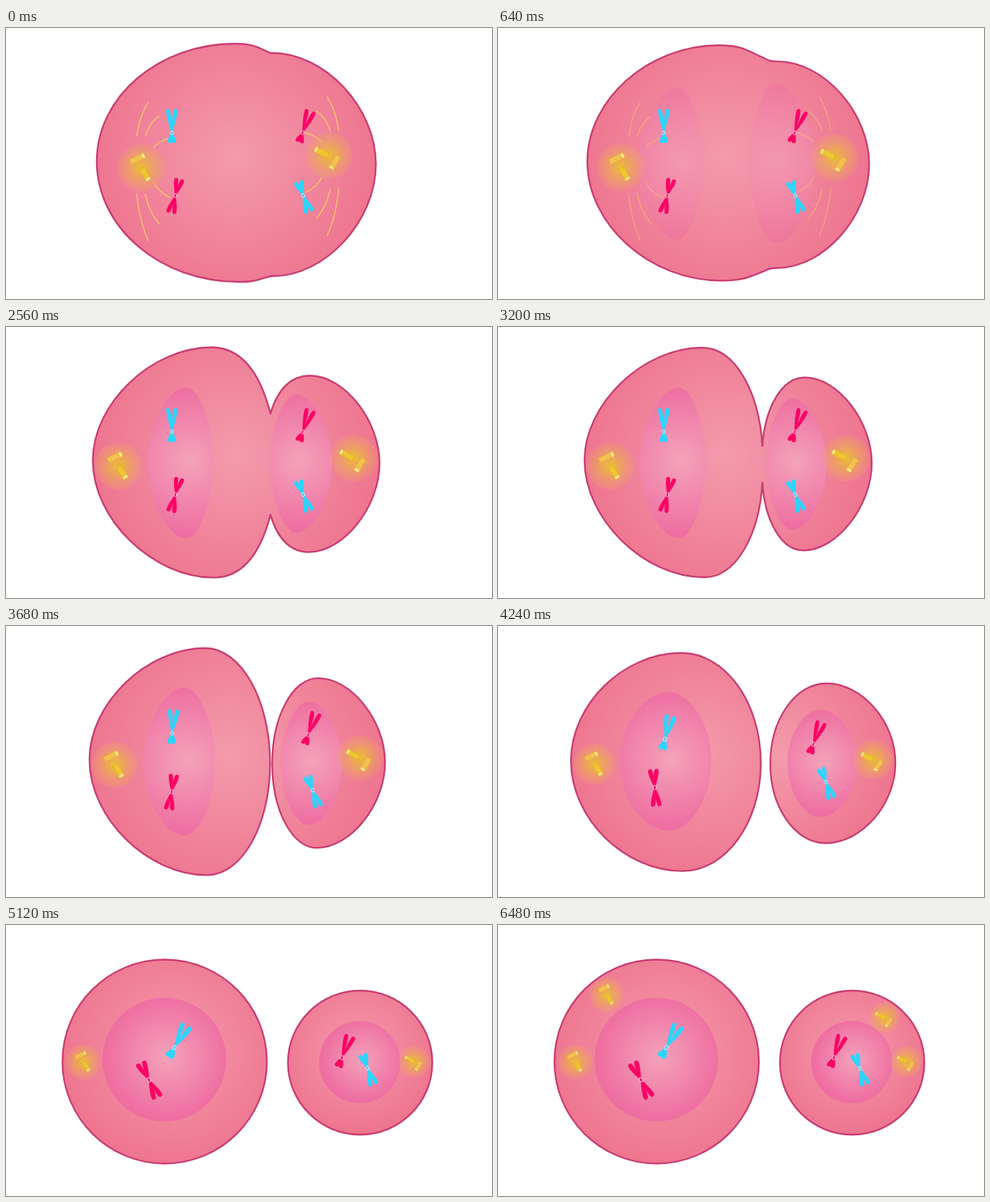
These frames come from a looping animation (680 px wide and 380 px high, 6.56 s). An HTML page with a canvas:

```html
<!DOCTYPE html>
<html lang="en">
<head>
<meta charset="utf-8">
<title>Cell division</title>
<style>
  html, body { margin: 0; width: 100%; height: 100%; overflow: hidden; background: #fff; }
  canvas { display: block; }
</style>
</head>
<body>
<canvas id="stage" width="680" height="380"></canvas>
<script>
const ctx = document.getElementById('stage').getContext('2d');
const LOOP = 6560, STEP = 80;
const SPLIT = 3520, ROUND = 5120;   // halves part, then become round
const K = 0.552;                    // Bezier handle length of a circle
const BLUE = '#2bd5fb', RED = '#fb0465';

const phase = (t, start, end) => Math.max(0, Math.min(1, (t - start) / (end - start)));
const mix = (a, b, p) => a + (b - a) * p;
const mixAll = (a, b, p) => a.map((v, i) => mix(v, b[i], p));

// whole -> split slows down by the given power; split -> round is even
function pose({ whole, split, round }, t, power) {
  if (t >= SPLIT) return mixAll(split, round, phase(t, SPLIT, ROUND));
  return mixAll(whole, split, 1 - (1 - t / SPLIT) ** power);
}

// side: -1 left, 1 right
function makeCell(side, whole, split, [x, y, r]) {
  return {
    whole, split,
    round: [x, y - r, x + side * r, y, x, y + r, K],
    inner: [x - side * r, y],
    light: [x - side * 8 + 4, y - 15, r * 1.15]
  };
}

// top x, y, outer x, y, bottom x, y, roundness; the last list is a circle
const cells = [
  makeCell(-1, [320, 22, 127, 187, 325, 356, .55],
    [285, 29, 121, 187, 288, 351, .5], [222, 191.5, 143]),
  makeCell(1, [372, 35, 517.5, 191, 373, 348, .51],
    [430, 71, 523, 191, 428, 313, .49], [495.5, 193, 101])
];

// peak x, top, bottom, left, right
const nuclei = [
  { whole: [251, 83, 297, 197, 286], split: [253, 85, 296, 199, 291],
    round: [221.5, 102, 275.5, 135, 308] },
  { whole: [382, 72, 306, 346, 440], split: [415, 103, 282, 378, 462],
    round: [495, 134.5, 250, 438, 551.5] }
];

// glow centre and radius; rods run from the plain end to the capped end
const poles = [
  { whole: [189, 196, 33.5], split: [157, 195, 33], round: [108, 192, 24.5],
    twin: [152, 98], rods: [[-15, -8, 3, -17], [1, 1, 10, 16]] },
  { whole: [451.5, 179, 33], split: [487, 184, 33], round: [571.5, 191.5, 22],
    twin: [541, 130], rods: [[14, 1, 4, 17], [-1, 0, -18, -9]] }
];

// arm lengths, then x, y, degrees, scale
const chromosomes = [
  { color: BLUE, up: 33, down: 14, from: [232, 147, 0, 1], to: [235.5, 172, 29, 1.1] },
  { color: RED, up: 24, down: 25, from: [237, 235, 14, 1], to: [200, 217, -26, 1.12] },
  { color: RED, up: 33, down: 14, from: [415, 147, 20, 1], to: [470, 186, 21, 1] },
  { color: BLUE, up: 21, down: 25, from: [416, 235, -20, 1], to: [506, 201, -20, 1] }
];

function radial(x, y, r, inner, outer) {
  const g = ctx.createRadialGradient(x, y, 0, x, y, r);
  g.addColorStop(0, inner);
  g.addColorStop(1, outer);
  return g;
}

// quarter arcs that leave or arrive horizontally
function arcFrom(path, x0, y0, x1, y1, k) {
  path.bezierCurveTo(mix(x0, x1, k), y0, x1, mix(y1, y0, k), x1, y1);
}
function arcInto(path, x0, y0, x1, y1, k) {
  path.bezierCurveTo(x0, mix(y0, y1, k), mix(x1, x0, k), y1, x1, y1);
}

function cellPath(cell, t) {
  const [tx, ty, sx, sy, bx, by, k] = pose(cell, t, 2);
  const furrow = phase(t, 0, SPLIT) ** 1.9;
  const [px, py] = mixAll([370, 193], cell.inner, phase(t, SPLIT, ROUND));
  const p1 = mix(35, py, furrow), p2 = mix(348, py, furrow);
  const lean = .35 * (1 - furrow);   // the furrow starts shallow
  const path = new Path2D();
  path.moveTo(px, p1);
  path.bezierCurveTo(mix(px, tx, lean), mix(p1, ty, K), mix(tx, px, K), ty, tx, ty);
  arcFrom(path, tx, ty, sx, sy, k);
  arcInto(path, sx, sy, bx, by, k);
  path.bezierCurveTo(mix(bx, px, K), by, mix(px, bx, lean), mix(p2, by, K), px, p2);
  return path;
}

function drawCells(t) {
  const paths = cells.map(cell => {
    const light = mixAll([320, 180, 205], cell.light, phase(t, SPLIT, ROUND));
    const path = cellPath(cell, t);
    ctx.fillStyle = radial(...light, '#f39bac', '#ee748f');
    ctx.fill(path);
    return path;
  });
  ctx.strokeStyle = '#c93d70';
  ctx.lineWidth = 2.4;
  paths.forEach(path => ctx.stroke(path));
}

function drawNucleus(nucleus, t) {
  const [x, top, bottom, left, right] = pose(nucleus, t, 1);
  const y = (top + bottom) / 2;
  const k = mix(.49, K, phase(t, SPLIT, ROUND));
  const path = new Path2D();
  path.moveTo(x, top);
  arcFrom(path, x, top, left, y, k);
  arcInto(path, left, y, x, bottom, k);
  arcFrom(path, x, bottom, right, y, k);
  arcInto(path, right, y, x, top, k);
  ctx.globalAlpha = .03 + .97 * phase(t, 0, 1280);
  ctx.fillStyle = radial(x + 4, y - 3, (bottom - top) / 2, '#f4a2ba', '#ee6ea0');
  ctx.fill(path);
  ctx.globalAlpha = 1;
}

// three fibres fan out above and below each pole, bending towards the middle
function drawFibres(t) {
  ctx.globalAlpha = 1 - phase(t, 0, 1280);
  ctx.strokeStyle = '#f4c768';
  ctx.lineWidth = 1.5;
  for (const [x, y, inward] of [[193, 192, 1], [455.5, 185, -1]])
    for (const reach of [-.9, 1.08])
      for (let i = 0; i < 3; i++) {
        const x0 = x + inward * (12 * i - 10), x1 = x + inward * (15 * i + 6);
        const y0 = y + Math.sign(reach) * (i < 2 ? 41 : 25);
        const y1 = y + reach * (98 - 16 * i - 6 * i * i);
        ctx.beginPath();
        ctx.moveTo(x0, y0);
        ctx.quadraticCurveTo(mix(x0, x1, .25), mix(y0, y1, .6), x1, y1);
        ctx.stroke();
      }
  ctx.globalAlpha = 1;
}

function drawRod([x0, y0, x1, y1], color) {
  const length = Math.hypot(x1 - x0, y1 - y0);
  ctx.save();
  ctx.translate(x0, y0);
  ctx.rotate(Math.atan2(y1 - y0, x1 - x0));
  ctx.strokeStyle = '#e3a93c';
  ctx.lineWidth = .7;
  ctx.fillStyle = color;
  ctx.beginPath();
  ctx.rect(0, -4, length, 8);
  ctx.fill();
  ctx.stroke();
  ctx.fillStyle = '#fbe98c';
  ctx.beginPath();
  ctx.ellipse(length, 0, 2.4, 4.2, 0, 0, 7);
  ctx.fill();
  ctx.stroke();
  ctx.restore();
}

function drawPole(x, y, r, rods) {
  ctx.save();
  ctx.translate(x, y);
  ctx.scale(r / 34, r / 34);
  ctx.fillStyle = radial(0, 0, 34, 'rgba(233,196,40,.93)', 'rgba(238,168,96,.2)');
  ctx.beginPath();
  ctx.arc(0, 0, 34, 0, 7);
  ctx.fill();
  drawRod(rods[0], '#f2c14e');
  drawRod(rods[1], '#eec62f');
  ctx.restore();
}

function drawPoles(pole, t) {
  const [x, y, r] = pose(pole, t, 4);
  drawPole(x, y, r, pole.rods);
  const apart = phase(t, 5280, 6480);
  if (apart > 0) drawPole(...mixAll([x, y], pole.twin, apart), r, pole.rods);
}

// teardrop from the middle to a blunt tip
function drawArm(x, y) {
  const length = Math.hypot(x, y);
  ctx.save();
  ctx.rotate(Math.atan2(y, x));
  ctx.beginPath();
  ctx.moveTo(-2, 0);
  ctx.bezierCurveTo(length * .5, -3, length * 1.1, -4.8, length, 0);
  ctx.bezierCurveTo(length * 1.1, 4.8, length * .5, 3, -2, 0);
  ctx.fill();
  ctx.restore();
}

function drawChromosome({ color, up, down, from, to }, t) {
  const [x, y, degrees, scale] = mixAll(from, to, phase(t, 3440, ROUND));
  ctx.save();
  ctx.translate(x, y);
  ctx.rotate(degrees * Math.PI / 180);
  ctx.scale(scale, scale);
  ctx.fillStyle = color;
  for (const side of [-1, 1]) {
    drawArm(side * (2 + up / 9), -up);
    drawArm(side * (2 + down / 9), down);
  }
  ctx.strokeStyle = 'rgba(255,255,255,.75)';
  ctx.lineWidth = .9;
  ctx.beginPath();
  ctx.ellipse(0, 0, 1.9, 2.9, 0, 0, 7);
  ctx.fill();
  ctx.stroke();
  ctx.restore();
}

function draw(t) {
  ctx.fillStyle = '#fff';
  ctx.fillRect(0, 0, 680, 380);
  ctx.lineCap = 'round';
  drawCells(t);
  nuclei.forEach(nucleus => drawNucleus(nucleus, t));
  drawFibres(t);
  poles.forEach(pole => drawPoles(pole, t));
  chromosomes.forEach(chromosome => drawChromosome(chromosome, t));
}

const start = performance.now();
function tick() {
  const t = (performance.now() - start) % LOOP;
  draw(Math.floor(t / STEP) * STEP);
  requestAnimationFrame(tick);
}
tick();
</script>
</body>
</html>
```
